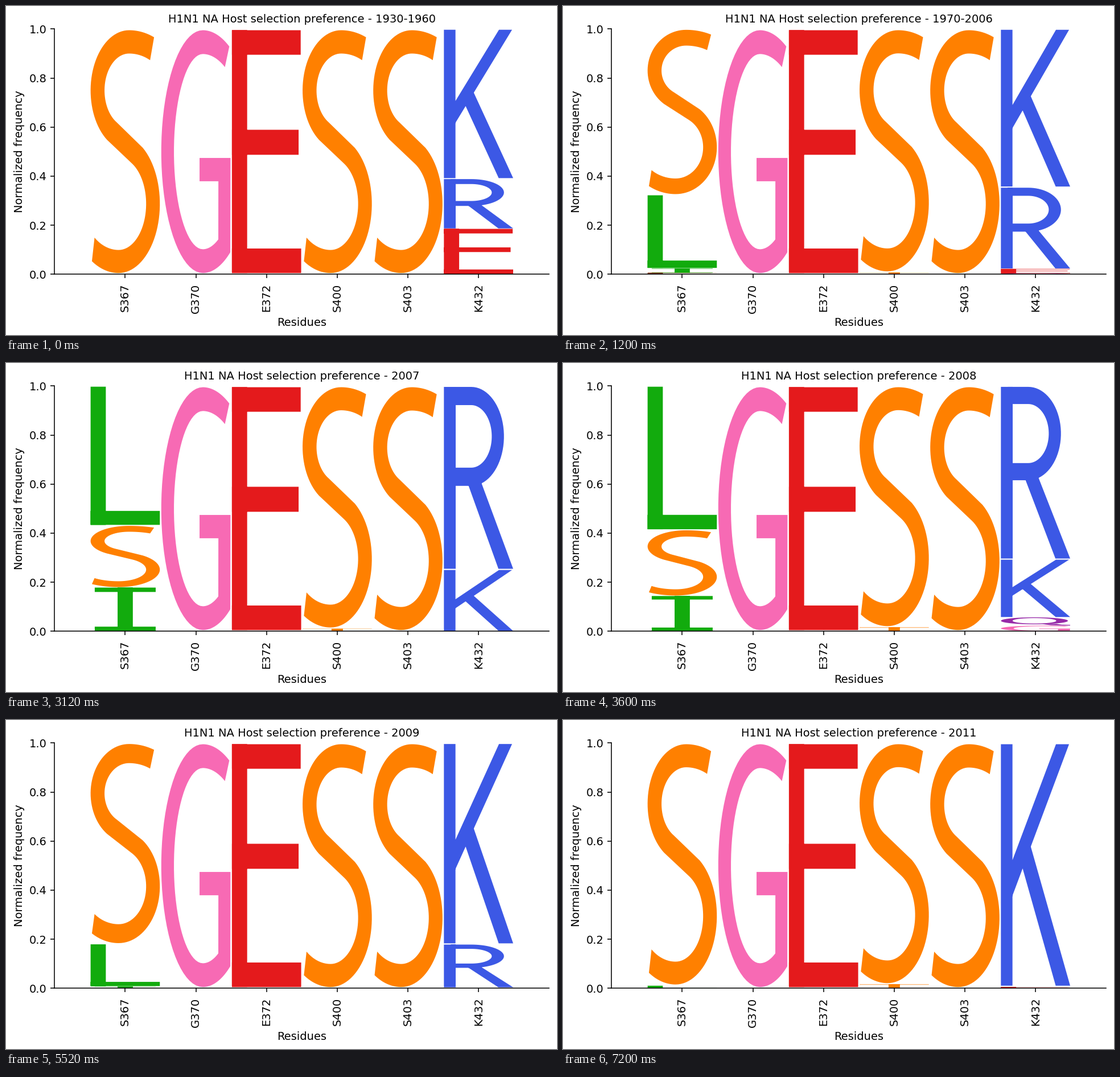
A matplotlib script that plays this animation: 968 by 578 pixels, repeating every 8000 ms.

```python
import numpy as np
import matplotlib.pyplot as plt
from matplotlib.animation import FuncAnimation
from matplotlib.patches import PathPatch
from matplotlib.path import Path

W, H, DPI = 968, 578, 100
LEFT, RIGHT, TOP, BOTTOM = 85.3, 954.3, 40.4, 471.3
PX = 72 / DPI  # points per pixel
LINE, TICK, PAD = 1.56 * PX, 6.8 * PX, 7.8 * PX

plt.rcParams["font.family"] = "DejaVu Sans"
plt.rcParams["font.size"] = 14


# Letters are drawn in a unit box; solid parts run clockwise, holes do not.
def rect(x0, y0, x1, y1):
    return [(x0, y0), (x0, y1), (x1, y1), (x1, y0)]


def arc(center, rx, ry, start, end):
    t = np.radians(np.linspace(start, end, 40))
    return [*zip(center[0] + rx * np.cos(t), center[1] + ry * np.sin(t))]


def glyph(*parts):
    return Path.make_compound_path(
        *(Path([*part, part[0]], closed=True) for part in parts))


def letter_s():
    upper, lower = (.555, .752), (.405, .285)
    return glyph(
        arc(upper, .77, .248, 62, 90) + arc(upper, .555, .248, 90, 235)
        + arc(lower, .397, .19, 60, -90) + arc(lower, .51, .19, 270, 227)
        + arc(lower, .69, .285, 236, 270) + arc(lower, .595, .285, -90, 54)
        + arc(upper, .354, .152, 240, 90) + arc(upper, .53, .152, 90, 55))


def letter_g():
    mid = (.6, .5)
    return glyph(
        arc(mid, .765, .5, 60, 90) + arc(mid, .6, .5, 90, 270)
        + arc(mid, .71, .5, 270, 304)
        + [(1, .474), (.553, .474), (.553, .378), (.825, .378)]
        + arc(mid, .511, .402, 296, 270) + arc(mid, .417, .402, 270, 90)
        + arc(mid, .638, .402, 90, 60))


def letter_r():
    mid = (.395, .728)
    return glyph(
        rect(0, 0, .17, 1),
        [(.1, 1), *arc(mid, .472, .272, 90, -90), (.1, .456)],
        [(.17, .556), *arc(mid, .296, .172, -90, 90), (.17, .9)],
        [(.495, .52), (1, 0), (.787, 0), (.315, .5)])


def letter_q():
    mid = (.484, .578)
    tail = [(.6, .18), (.8, .2), (.88, .11), (1, .09),
            (1, .007), (.9, 0), (.72, .05)]
    return glyph(arc(mid, .484, .422, 360, 0),
                 arc(mid, .316, .333, 0, 360), tail)


STEM, BAR = .22, .101
stem = rect(0, 0, STEM, 1)
foot, head = rect(0, 0, 1, BAR), rect(0, 1 - BAR, 1, 1)

GLYPHS = {
    "S": letter_s(),
    "G": letter_g(),
    "R": letter_r(),
    "Q": letter_q(),
    "E": glyph(stem, foot, rect(0, .487, .963, .59),
               rect(0, 1 - BAR, .993, 1)),
    "F": glyph(stem, head, rect(0, .45, .92, .55)),
    "L": glyph(stem, foot),
    "T": glyph(rect(.418, 0, .582, 1), head),
    "I": glyph(rect(.39, 0, .61, 1), rect(.06, 0, .94, BAR),
               rect(.06, 1 - BAR, .94, 1)),
    "K": glyph(rect(0, 0, .167, 1),
               [(.15, .507), (.795, 1), (.984, 1), (.15, .36)],
               [(.37, .638), (1, 0), (.791, 0), (.27, .53)]),
}

GROUPS = {"ST": "#FF8000", "G": "#F76AB4", "E": "#E41A1C", "KR": "#3C58E5",
          "LI": "#12AB0D", "Q": "#972AA8", "F": "#84380B"}
COLORS = {letter: color for group, color in GROUPS.items() for letter in group}

SITES = ["S367", "G370", "E372", "S400", "S403", "K432"]

# Each period's stacks where residues vary: letters from the top down,
# then the heights that divide them. Other sites keep a single letter.
SCENES = {
    "1930-1960": {"K432": ("KRE", .389, .186)},
    "1970-2006": {"S367": ("SLIF", .3235, .0245, .006), "S400": ("ST", .007),
                  "K432": ("KREQ", .3545, .022, .004)},
    "2007": {"S367": ("LSI", .431, .179), "S400": ("ST", .0105),
             "K432": ("RK", .251)},
    "2008": {"S367": ("LSI", .413, .1445), "S400": ("ST", .016),
             "K432": ("RKQG", .293, .057, .023)},
    "2009": {"S367": ("SLI", .18, .008), "K432": ("KR", .179, .003)},
    "2010": {"S367": ("SLT", .0135, .005), "S400": ("ST", .0085),
             "K432": ("KR", .0085)},
    "2011": {"S367": ("SL", .0105), "S400": ("ST", .016),
             "K432": ("KE", .0055)},
}

fig = plt.figure(figsize=(W / DPI, H / DPI), dpi=DPI, facecolor="white")
ax = fig.add_axes([LEFT / W, 1 - BOTTOM / H,
                   (RIGHT - LEFT) / W, (BOTTOM - TOP) / H])
ax.set_xlim(0, len(SITES) + 1)
ax.set_ylim(0, 1)
ax.set_xticks(range(1, len(SITES) + 1), SITES, rotation=90)
ax.set_yticks(np.linspace(0, 1, 6))
ax.tick_params(length=TICK, width=LINE, pad=TICK)
ax.tick_params(axis="x", pad=9.4 * PX)
ax.spines[["top", "right"]].set_visible(False)
ax.spines[["left", "bottom"]].set_linewidth(LINE)
ax.set_xlabel("Residues", labelpad=PAD)
ax.set_ylabel("Normalized frequency", labelpad=PAD)
title = ax.set_title("", fontsize=14, pad=1.5 * PAD)

patches = []


def draw_stack(x, letters, *cuts):
    for letter, top, floor in zip(letters, (1, *cuts), (*cuts, 0)):
        shape = GLYPHS[letter]
        gx, gy = shape.vertices.T
        xs = x + .98 * (gx - .5)
        ys = floor + (top - floor) * (.005 + .99 * gy)
        path = Path(np.column_stack([xs, ys]), shape.codes)
        patch = PathPatch(path, facecolor=COLORS[letter], linewidth=0,
                          snap=False)
        patches.append(ax.add_patch(patch))


def update(i):
    while patches:
        patches.pop().remove()
    period, stacks = list(SCENES.items())[i // 3]
    title.set_text(f"H1N1 NA Host selection preference - {period}")
    for x, site in enumerate(SITES, 1):
        draw_stack(x, *stacks.get(site, site[0]))
    return patches


anim = FuncAnimation(fig, update, frames=20, interval=400,
                     init_func=lambda: patches, repeat=True, repeat_delay=0)
plt.show()
```
